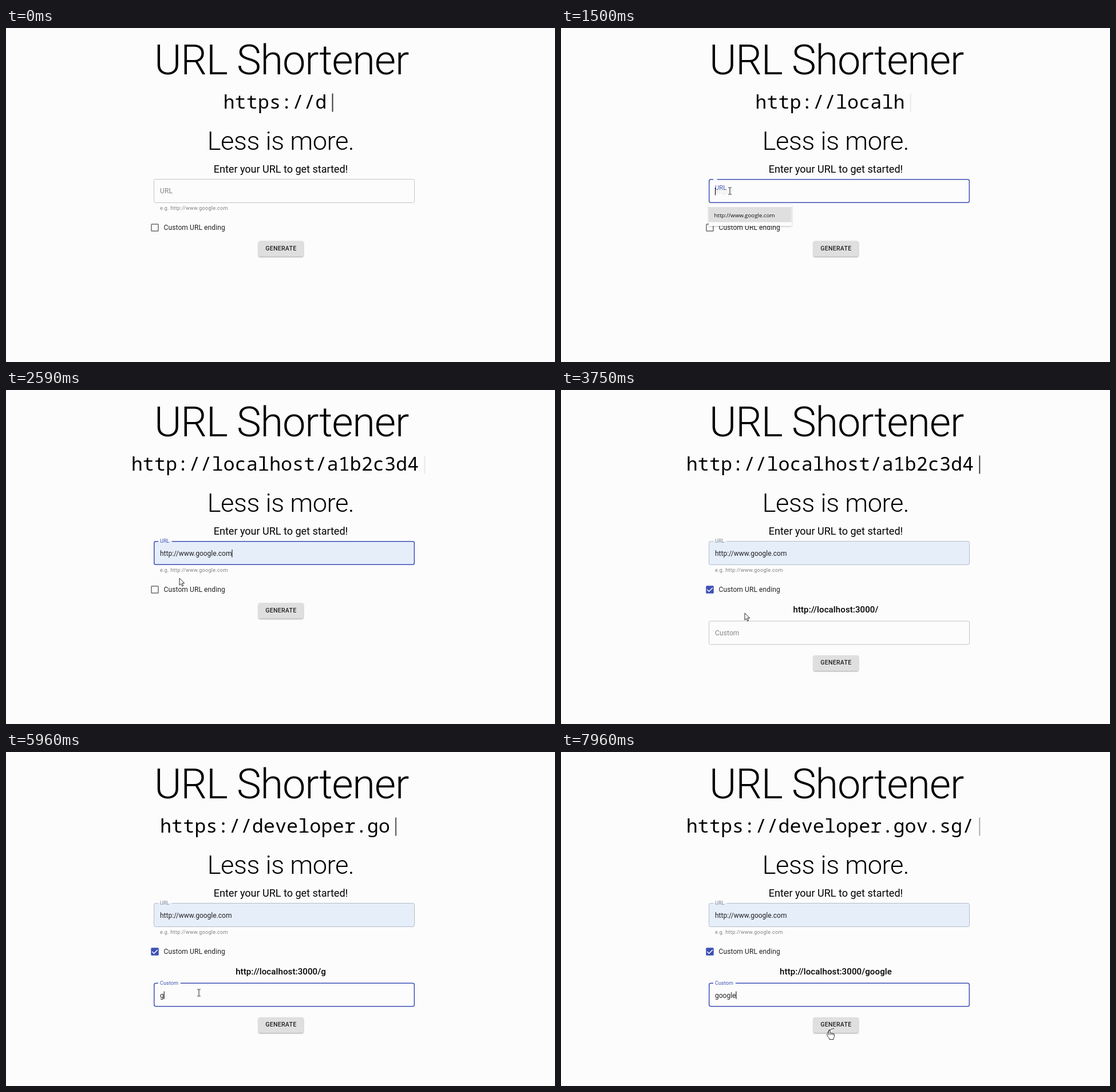
An HTML page that plays this animation: 959 px wide and 584 px high, repeating every 8 s.

```html
<!DOCTYPE html>
<html lang="en">
<head>
<meta charset="utf-8">
<title>URL Shortener</title>
<style>
  html, body { margin: 0; width: 100%; height: 100%; overflow: hidden; background: #fcfcfc; }
  svg { display: block; width: 959px; height: 584px; font: 12px Roboto, sans-serif; }
  .mid { text-anchor: middle; }
  .h1 { font-size: 72px; font-weight: 300; letter-spacing: -.01562em; }
  .h2 { font-size: 45px; font-weight: 300; letter-spacing: -.00833em; }
  .h5 { font-size: 18px; }
  .h6 { font-size: 15px; font-weight: 500; letter-spacing: .0075em; }
  .mono { font: 33.5px "Roboto Mono", "Noto Sans Mono", monospace; }
  .body { letter-spacing: .00938em; fill: #212121; }
  .hint { font-size: 9px; letter-spacing: .03333em; fill: #808080; }
  .option { font: 9.75px "Open Sans", sans-serif; fill: #111; }
  .button { font-size: 10.5px; font-weight: 500; letter-spacing: .02857em; fill: #212121; }
  .raised { filter: drop-shadow(0 1px 1.2px rgba(0, 0, 0, .38)); }
  .popup { filter: drop-shadow(0 1px 1.5px rgba(0, 0, 0, .25)); }
</style>
</head>
<body>
<svg viewBox="0 0 959 584">
  <text class="mid h1" x="481" y="80.5">URL Shortener</text>
  <text class="mid h2" x="480" y="212.5">Less is more.</text>
  <text class="mid h5" x="480" y="253">Enter your URL to get started!</text>
  <text class="hint" x="269" y="318">e.g. http://www.google.com</text>
  <text class="body" x="275.5" y="353">Custom URL ending</text>
  <g id="live"></g>
</svg>
<script>
const LOOP = 8000;
const INDIGO = '#3f51b5';
const LOCAL = 'http://localhost/a1b2c3d4';
const REMOTE = 'https://developer.gov.sg/';
const ENDING = 'google';

// Moments of the user's actions, in ms
const AT = { urlFocus: 1480, pick: 2300, check: 3430, customFocus: 4500, firstKey: 5850, keyGap: 140 };

// Pointer stops: time, x, y
const STOPS = [
  [200, 600, 382], [800, 295, 285], [1500, 295, 285], [1900, 311, 325],
  [2450, 311, 325], [3000, 262, 350], [3450, 262, 350], [3740, 321, 390],
  [3900, 321, 390], [4350, 337, 421], [7480, 337, 421], [7860, 469, 486]
];

const live = document.getElementById('live');
const ruler = document.createElement('canvas').getContext('2d');
const clamp = (v, lo = 0, hi = 1) => Math.min(hi, Math.max(lo, v));
const smooth = x => x * x * (3 - 2 * x);
const count = (t, start, step, max) => clamp(Math.floor((t - start) / step), 0, max);

function textWidth(text) {
  ruler.font = '12px Roboto, sans-serif';
  return ruler.measureText(text).width;
}

function typedUrl(t) {
  if (t < 405) return REMOTE.slice(0, 9 - count(t, 55, 35, 9));
  if (t < 4235) return LOCAL.slice(0, count(t, 410, 83, 25));
  if (t < 4385) return LOCAL.slice(0, 25 - count(t, 4229, 6, 25));
  return REMOTE.slice(0, count(t, 4385, 78, 25));
}

function typewriter(t) {
  const text = typedUrl(t), step = 20.1;
  const left = 480 - (text.length + 1) * step / 2;
  const phase = (t - 211 + 2 * 942) % 942 / 471;
  const eased = smooth((phase % 1) ** .6);
  const opacity = phase < 1 ? 1 - eased : eased;
  return `<text class="mono" x="${left}" y="141">${text}</text>
    <rect x="${left + (text.length + .5) * step - 1}" y="114.5" width="2" height="32" opacity="${opacity}"/>`;
}

function field({ y, label, placeholder, value, focused, open, filled, caretOn }) {
  const color = focused ? INDIGO : filled ? '#7f8794' : '#858585';
  const inset = focused ? .75 : .5;
  const [l, r, top, bottom] = [258 + inset, 714 - inset, y + inset, y + 42 - inset];
  const gap = open * (textWidth(label) * .75 + 7.5);
  const border = `M${266 + gap} ${top}H${r - 3}a3 3 0 0 1 3 3V${bottom - 3}a3 3 0 0 1-3 3H${l + 3}
    a3 3 0 0 1-3-3V${top + 3}a3 3 0 0 1 3-3H266`;
  return `
    ${filled ? `<rect x="258" y="${y}" width="456" height="42" rx="3" fill="#e6eefa"/>` : ''}
    <path d="${border}" fill="none" stroke="${focused ? INDIGO : filled ? '#b3bccb' : '#c4c4c4'}"
      stroke-width="${focused ? 1.5 : 1}"/>
    <text class="body" style="fill:${color}"
      transform="translate(269 ${y + 25 - 21.7 * open}) scale(${1 - .25 * open})">${label}</text>
    <text x="269" y="${y + 26}" fill="${value ? '#212121' : '#b0b0b0'}"
      opacity="${value ? 1 : open}">${value || placeholder}</text>
    ${caretOn ? `<rect x="${269 + textWidth(value)}" y="${y + 15}" width="1" height="13.5"/>` : ''}`;
}

function checkbox(checked) {
  return checked
    ? `<rect x="253.25" y="342.25" width="13.5" height="13.5" rx="1.5" fill="${INDIGO}"/>
       <path d="M255.2 349l3.3 3.3 6.3-6.3" fill="none" stroke="#fff" stroke-width="1.5"/>`
    : `<rect x="254" y="343" width="12" height="12" rx=".8" fill="none" stroke="#6b6b6b" stroke-width="1.5"/>`;
}

const suggestion = `
  <rect class="popup" x="258" y="309" width="145" height="37" fill="#fdfdfd"/>
  <rect x="258" y="313" width="144.5" height="26.5" fill="#dfdfdf"/>
  <text class="option" x="267.5" y="330.5">http://www.google.com</text>`;

const button = y => `
  <rect class="raised" x="441" y="${y}" width="78.5" height="27" rx="3" fill="#dfdfdf"/>
  <text class="mid button" x="480.4" y="${y + 16.2}">GENERATE</text>`;

const POINTERS = {
  arrow: '<path d="M0 0V12.2L2.8 9.6 4.7 14 6.7 13.1 4.8 8.8H8.6Z" fill="#fff" stroke="#111" stroke-width=".9"/>',
  beam: '<path d="M-2.8-6H-.6L0-5.4 .6-6H2.8M0-5.4V5.4M-2.8 6H-.6L0 5.4 .6 6H2.8" fill="none" stroke="#222"/>',
  hand: `<path d="M-1.3 9.3V.8Q0-.9 1.3 .8V5.5Q2.7 4.6 3.8 6 5.2 5.2 6.2 6.7 8.2 6 8.4 8V11.5Q8 13.5 7 14.7V16.6H-.2V15
    Q-2.5 12.7-4.3 9.7-4-.2 8-2.7 8Z" fill="#fff" stroke="#111" stroke-width=".9"/>
    <path d="M1.3 5.5V8.8M3.8 6V9M6.2 6.7V9.2" stroke="#111" stroke-width=".7"/>`
};

function pointer(t, menuOpen, checked, buttonY) {
  if (t < STOPS[0][0]) return '';
  const next = STOPS.findIndex(s => s[0] > t);
  const b = STOPS.at(next), a = next > 0 ? STOPS[next - 1] : b;
  const k = smooth(clamp((t - a[0]) / (b[0] - a[0] || 1)));
  const x = a[1] + (b[1] - a[1]) * k, y = a[2] + (b[2] - a[2]) * k;
  const inside = (l, top, w, h) => x >= l && x <= l + w && y >= top && y <= top + h;
  const overField = inside(258, 264, 456, 42) || checked && inside(258, 404, 456, 42);
  const overControl = inside(441, buttonY, 79, 27) || !menuOpen && inside(246, 337, 137, 24);
  const shape = overField ? 'beam' : overControl ? 'hand' : 'arrow';
  return `<g transform="translate(${x} ${y})">${POINTERS[shape]}</g>`;
}

function render(t) {
  const picked = t >= AT.pick, checked = t >= AT.check;
  const urlFocused = t >= AT.urlFocus && !checked;
  const customFocused = t >= AT.customFocus;
  const menuOpen = urlFocused && !picked;
  const keys = count(t, AT.firstKey - AT.keyGap, AT.keyGap, ENDING.length);
  const ending = ENDING.slice(0, keys);
  const lastKey = keys ? AT.firstKey + (keys - 1) * AT.keyGap : AT.customFocus;
  const blink = since => (t - since) % 1000 < 500;
  const opening = start => 1 - (1 - clamp((t - start) / 200)) ** 3;
  const buttonY = checked ? 464 : 372.5;

  live.innerHTML = typewriter(t) + checkbox(checked) + field({
    y: 264, label: 'URL', placeholder: 'http://', value: picked ? 'http://www.google.com' : '',
    focused: urlFocused, open: opening(AT.urlFocus), filled: picked,
    caretOn: urlFocused && blink(picked ? AT.pick : AT.urlFocus)
  }) + (checked ? `<text class="mid h6" x="480" y="389">http://localhost:3000/${ending}</text>` + field({
    y: 403.5, label: 'Custom', placeholder: 'custom', value: ending,
    focused: customFocused, open: opening(AT.customFocus), filled: false,
    caretOn: customFocused && blink(lastKey)
  }) : '') + button(buttonY) + (menuOpen ? suggestion : '') + pointer(t, menuOpen, checked, buttonY);
}

const start = performance.now();
function tick() {
  render((performance.now() - start) % LOOP);
  requestAnimationFrame(tick);
}
tick();
</script>
</body>
</html>
```
